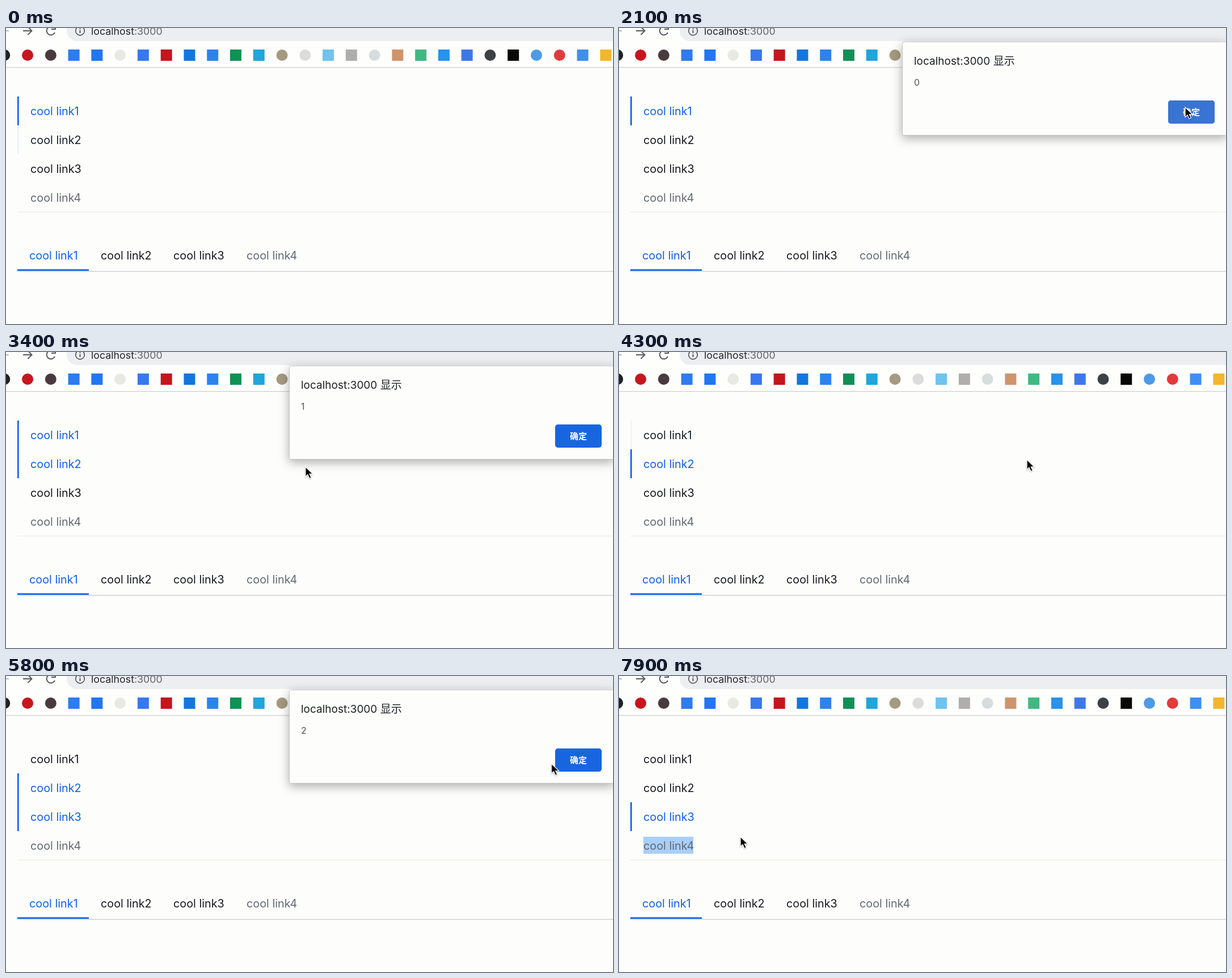
An HTML page that plays this animation: 1070 px wide and 523 px high, repeating every 8000 ms.

```html
<!DOCTYPE html>
<html lang="zh">
<head>
<meta charset="utf-8">
<title>Menu demo</title>
<style>
@property --on { syntax: "<number>"; inherits: true; initial-value: 0; }
html, body { margin: 0; width: 100%; height: 100%; overflow: hidden; background: #fdfdfb; }
svg { display: block; width: 1070px; height: 523px; font-family: Inter, "Noto Sans CJK SC", "Noto Sans CJK", sans-serif; }
.menu { font-size: 19.8px; }
.link { --on: 0; }
.link text { fill: color-mix(in srgb, #0c60e8 calc(var(--on) * 100%), #16181d); }
.link rect { fill: #0b62f3; opacity: var(--on); }
.disabled text { fill: #626972; }

.link1 { animation: link1 8s linear infinite; }
.link2 { animation: link2 8s linear infinite; }
.link3 { animation: link3 8s linear infinite; }
@keyframes link1 { 0%, 51.25% { --on: 1; } 53.9%, 100% { --on: 0; } }
@keyframes link2 {
  0% { --on: .08; } 2%, 38.74% { --on: 0; }
  38.75%, 76.25% { --on: 1; } 78.7%, 100% { --on: 0; }
}
@keyframes link3 { 0%, 63.74% { --on: 0; } 63.75%, 100% { --on: 1; } }

.alert, .hover, .count, .selection { opacity: 0; animation: 8s step-end infinite; }
.alert { animation-name: alert; }
.hover { animation-name: hover; }
.count0 { animation-name: count0; }
.count1 { animation-name: count1; }
.count2 { animation-name: count2; }
.selection { animation-name: selection; }
@keyframes alert {
  0%, 28.75%, 51.25%, 76.25%, 100% { opacity: 0; }
  18.75%, 38.75%, 63.75% { opacity: 1; }
}
@keyframes hover {
  0%, 28.75%, 51.25%, 76.25%, 100% { opacity: 0; }
  24.5%, 47.5%, 73.2% { opacity: 1; }
}
@keyframes count0 { 0% { opacity: 1; } 35%, 100% { opacity: 0; } }
@keyframes count1 { 0%, 58%, 100% { opacity: 0; } 35% { opacity: 1; } }
@keyframes count2 { 0% { opacity: 0; } 58%, 100% { opacity: 1; } }
@keyframes selection { 0% { opacity: 0; } 88.75%, 100% { opacity: 1; } }

.panel { filter: drop-shadow(0 5px 9px rgba(0, 0, 0, .32)); }
.cursor { animation: move 8s ease-in-out infinite; filter: drop-shadow(0 1px 1px rgba(0, 0, 0, .3)); }
@keyframes move {
  0%, 3.75% { transform: translate(1085px, 300px); }
  13.75%, 18.75% { transform: translate(130px, 150px); }
  25%, 28.75% { transform: translate(998px, 140px); }
  35% { transform: translate(120px, 200px); }
  38.75% { transform: translate(120px, 200px); animation-timing-function: ease-in; }
  42.5% { transform: translate(526px, 203px); animation-timing-function: ease-out; }
  48.1% { transform: translate(1000px, 148px); }
  51.25% { transform: translate(1000px, 148px); animation-timing-function: ease-in; }
  53.75% { transform: translate(721px, 190px); animation-timing-function: ease-out; }
  60%, 63.75% { transform: translate(115px, 250px); }
  72.5% { transform: translate(961px, 155px); animation-timing-function: ease-out; }
  73.75%, 76.25% { transform: translate(990px, 150px); }
  81.25% { transform: translate(184px, 308px); animation-timing-function: ease-out; }
  83.75%, 91.25% { transform: translate(110px, 302px); }
  98.75%, 100% { transform: translate(214px, 284px); }
}
</style>
</head>
<body>
<svg viewBox="0 0 1070 523">
  <rect width="1070" height="523" fill="#fdfdfb"/>

  <g class="toolbar">
    <rect width="1070" height="69" fill="#fefefd"/>
    <rect x="107" y="-13" width="1000" height="36" rx="18" fill="#eceef1"/>
    <g fill="none" stroke="#55585d" stroke-width="2">
      <path d="M-8 5H5" stroke="#b5b7ba"/>
      <path d="M30 5H45M38.500 -2L45.500 5L38.500 12"/>
      <path d="M86 8A7.500 7.500 0 1 1 84 -1M87 -5V2H80"/>
      <circle cx="130.500" cy="5" r="7.800" stroke-width="1.700"/>
      <path d="M130.500 4V9M130.500 .5V2.500"/>
    </g>
    <text x="150" y="11.500" font-size="17.800" fill="#25272b">localhost<tspan fill="#62666b">:3000</tspan></text>
    <g id="bookmarks"></g>
    <rect y="69" width="1070" height="1.300" fill="#cfcfd3"/>
  </g>

  <g class="menu">
    <rect class="selection" x="43" y="284" width="88" height="30" fill="#a8cff9"/>
    <g class="link link1"><rect x="20" y="121" width="2.700" height="51"/><text x="43" y="154">cool link1</text></g>
    <g class="link link2"><rect x="20" y="172" width="2.700" height="51"/><text x="43" y="205">cool link2</text></g>
    <g class="link link3"><rect x="20" y="223" width="2.700" height="51"/><text x="43" y="256">cool link3</text></g>
    <g class="disabled"><text x="43" y="307">cool link4</text></g>
    <rect x="20" y="324.500" width="1050" height="1.300" fill="#efeddf"/>
  </g>

  <g class="menu">
    <rect x="20" y="429" width="1050" height="2" fill="#dadae4"/>
    <g class="link" style="--on: 1"><rect x="20" y="426.300" width="126" height="2.700"/><text x="41" y="408.500">cool link1</text></g>
    <g class="link"><text x="167" y="408.500">cool link2</text></g>
    <g class="link"><text x="295" y="408.500">cool link3</text></g>
    <g class="disabled"><text x="424" y="408.500">cool link4</text></g>
  </g>

  <g class="alert">
    <rect class="panel" x="499.500" y="24.500" width="572" height="165" rx="3" fill="#fdfdfc" stroke="#c3c3c3"/>
    <text x="520" y="65" font-size="19" fill="#1d1f23">localhost:3000 显示</text>
    <g font-size="16" fill="#505358">
      <text class="count count0" x="520" y="102">0</text>
      <text class="count count1" x="520" y="102">1</text>
      <text class="count count2" x="520" y="102">2</text>
    </g>
    <rect x="968" y="128" width="82" height="41" rx="5" fill="#1866df"/>
    <rect class="hover" x="968" y="128" width="82" height="41" rx="5" fill="#3974d2"/>
    <text x="1009" y="154.300" font-size="15" font-weight="600" text-anchor="middle" fill="#fff">确定</text>
  </g>

  <path class="cursor" d="M0 0V17.500L4 13.800L7 20.500L10.300 19L7.400 12.600H13Z" fill="#000" stroke="#fff" stroke-width="1.300"/>
</svg>
<script>
// Each bookmark: c = circle or s = square, followed by its colour.
const bookmarks = `c#202124 c#c7161e c#493a40 s#2d7cf0 s#2176f2 c#e9e9e4 s#3778ee s#c4161c s#1276df
  s#2c83ef s#0f9156 s#20a5dc c#a59a80 c#dcdcdc s#70c3ed s#b0aeac c#d5dddd s#cf946c s#41b883
  s#2793ed s#3e78e8 c#3d4145 s#080808 c#4d9ae6 c#e23a3c s#3e8ff0 s#f3b62d`.split(/\s+/);
const icon = (entry, i) => {
  const x = -2.7 + i * 40.77, fill = entry.slice(1);
  return entry[0] === "c"
    ? `<circle cx="${x}" cy="48" r="10" fill="${fill}"/>`
    : `<rect x="${x - 10}" y="38" width="20" height="20" fill="${fill}"/>`;
};
document.getElementById("bookmarks").innerHTML = bookmarks.map(icon).join("");
</script>
</body>
</html>
```
